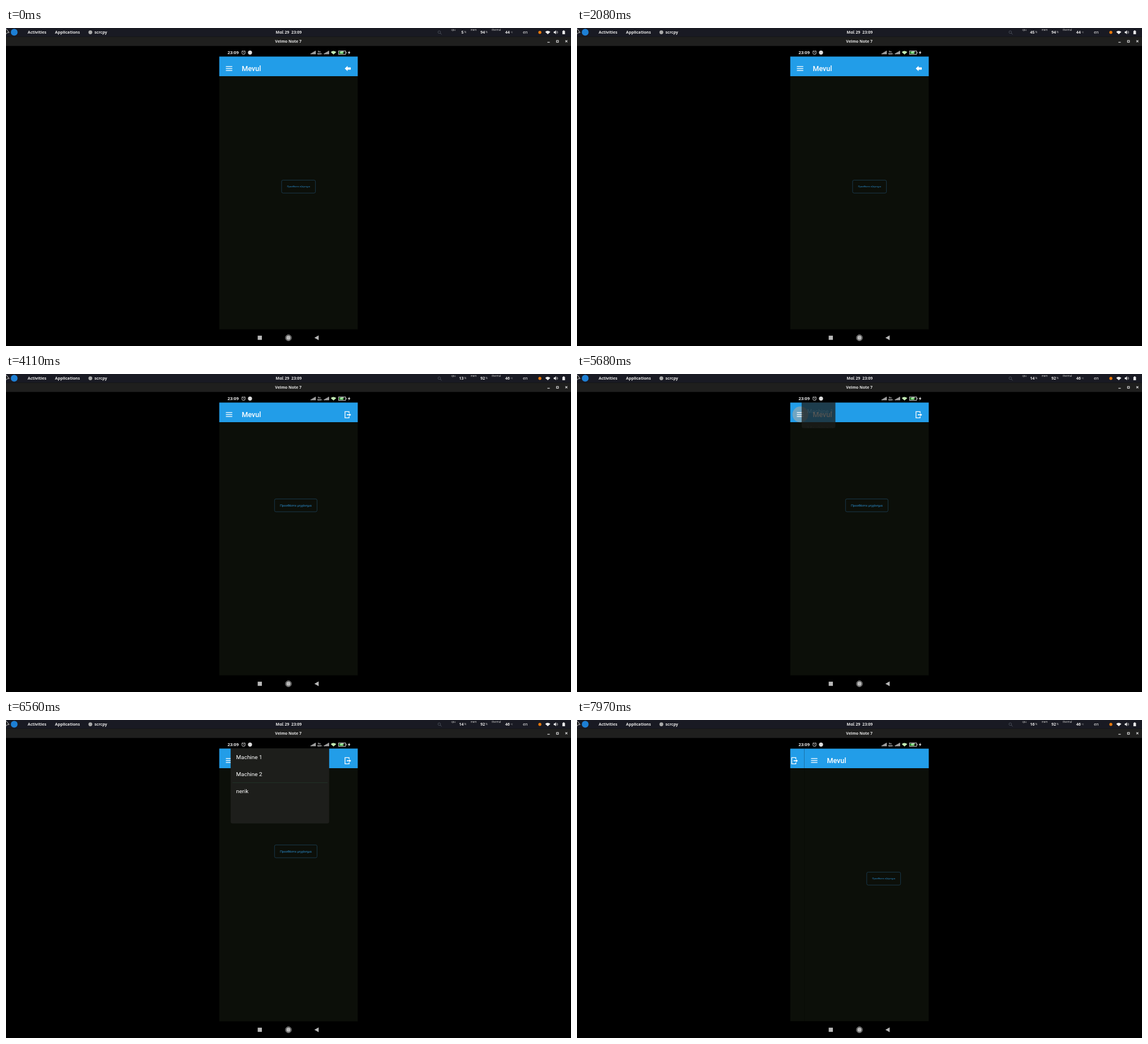
These frames come from a looping animation (998 by 561 pixels, 8 s). An HTML page with a canvas:

```html
<!DOCTYPE html>
<html lang="el">
<head>
<meta charset="utf-8">
<title>Phone mirror</title>
<style>
html, body { margin: 0; width: 100%; height: 100%; overflow: hidden; background: #000; }
canvas { display: block; width: 998px; height: 561px; }
</style>
</head>
<body>
<canvas id="stage" width="998" height="561"></canvas>
<script>
const ctx = document.getElementById('stage').getContext('2d');
const LOOP = 8000;
const NOTO = '"Noto Sans", sans-serif';
const ROBOTO = 'Roboto, sans-serif';
const APP = { x: 376.7, y: 50.4, w: 244.6, h: 481.2, bar: 34.6 };
const SURFACE = '#0c0f09';

const clamp = v => Math.max(0, Math.min(1, v));
const span = (t, from, to) => clamp((t - from) / (to - from));

function rect(x, y, w, h, color) {
  ctx.fillStyle = color;
  ctx.fillRect(x, y, w, h);
}

function text(str, x, y, size, { weight = 400, family = NOTO, color = '#fff', align = 'left' } = {}) {
  ctx.font = `${weight} ${size}px ${family}`;
  ctx.fillStyle = color;
  ctx.textAlign = align;
  ctx.fillText(str, x, y);
}

function disc(x, y, r, color) {
  ctx.fillStyle = color;
  ctx.beginPath();
  ctx.arc(x, y, r, 0, 7);
  ctx.fill();
}

function ring(x, y, r, width, color) {
  ctx.strokeStyle = color;
  ctx.lineWidth = width;
  ctx.beginPath();
  ctx.arc(x, y, r, 0, 7);
  ctx.stroke();
}

function trace(pts) {
  ctx.beginPath();
  pts.forEach(([x, y]) => ctx.lineTo(x, y));
}

function poly(pts, color) {
  trace(pts);
  ctx.closePath();
  ctx.fillStyle = color;
  ctx.fill();
}

function line(pts, width, color) {
  trace(pts);
  ctx.strokeStyle = color;
  ctx.lineWidth = width;
  ctx.stroke();
}

function wifi(x, y, r, color) {
  ctx.fillStyle = color;
  ctx.beginPath();
  ctx.moveTo(x, y);
  ctx.arc(x, y, r, -Math.PI * 0.77, -Math.PI * 0.23);
  ctx.fill();
}

function signal(x) {
  for (let i = 0; i < 5; i++) {
    const h = 1.5 + i * 1.1;
    rect(x + i * 1.9, 46.3 - h, 1.4, h, '#ddd');
  }
}

function drawTopBar(t) {
  const bold = { weight: 700, color: '#e6e6e6' };
  const right = { ...bold, align: 'right' };
  const small = { color: '#bbb' };
  const caption = { color: '#ccc' };
  rect(0, 0, 998, 15.5, '#191a23');
  disc(14.5, 7.5, 6, '#1d7fd4');
  poly([[0, 1], [5.5, 8], [2.5, 8.3], [0, 10.5]], '#222');
  line([[0, 1], [5.5, 8], [2.5, 8.3], [0, 10.5]], 0.9, '#ddd');
  text('Activities', 38.3, 10.3, 7.1, bold);
  text('Applications', 86.5, 10.3, 7.1, bold);
  disc(149, 7.6, 3.4, '#aaa');
  text('scrcpy', 156.3, 10.3, 7.1, bold);
  text('Μαΐ 29  23:09', 499.3, 10.3, 7.1, { ...bold, align: 'center' });

  ring(765.3, 7.3, 2.3, 0.9, '#4c525c');
  line([[767, 9], [769.5, 11.3]], 1, '#4c525c');

  const cpu = t < 2080 ? 5 : t < 3640 ? 45 : t < 5150 ? 13 : t < 6680 ? 14 : 16;
  const late = t >= 3920;
  text('cpu', 786.5, 4.8, 4.4, caption);
  text(cpu, 808.4, 10.3, 7.1, right);
  text('%', 809.5, 9.2, 4.4, small);
  text('mem', 820.7, 4.8, 4.4, caption);
  text(late ? 92 : 94, 846, 10.3, 7.1, right);
  text('%', 847, 9.2, 4.4, small);
  text('thermal', 858, 4.8, 4.4, caption);
  text(late ? 46 : 44, 889.9, 10.3, 7.1, right);
  text('°C', 891, 9.2, 4.2, small);
  text('en', 913, 10.3, 7.3, { color: '#eee', weight: 500 });

  disc(943, 7.8, 2.7, '#e8790c');
  wifi(957, 11, 6, '#eee');
  poly([[967.5, 6.2], [969, 6.2], [971.4, 4], [971.4, 11], [969, 9], [967.5, 9]], '#eee');
  for (const r of [1.6, 3.2]) {
    ctx.beginPath();
    ctx.arc(971.3, 7.6, r, -0.9, 0.9);
    ctx.strokeStyle = '#ccc';
    ctx.lineWidth = 0.8;
    ctx.stroke();
  }
  rect(982.8, 5.2, 4.6, 5.8, '#eee');
  rect(984, 4.2, 2.2, 1, '#eee');
}

function drawTitleBar() {
  rect(0, 15.5, 998, 16.2, '#1f1f1e');
  text('Velmo Note 7', 498.6, 26.3, 7, { weight: 700, color: '#e4e4e4', align: 'center' });
  rect(956.3, 24.6, 4.2, 1.2, '#ddd');
  ctx.strokeStyle = '#ddd';
  ctx.lineWidth = 1.1;
  ctx.strokeRect(972.4, 22, 3.4, 3.2);
  line([[988, 21.6], [991.6, 25.2]], 1.1, '#ddd');
  line([[991.6, 21.6], [988, 25.2]], 1.1, '#ddd');
}

function drawPhoneFrame() {
  text('23:09', 391.3, 46.3, 7.7, { weight: 700, color: '#eee' });
  ring(419.6, 43.6, 3, 0.9, '#ddd');
  line([[419.6, 41.8], [419.6, 43.8], [421, 44.5]], 0.7, '#ddd');
  line([[416, 41.6], [418, 39.8]], 0.8, '#ddd');
  line([[421.2, 39.8], [423.2, 41.6]], 0.8, '#ddd');
  disc(431, 43.3, 3.6, '#ddd');
  signal(538);
  text('Vo', 550.8, 42.8, 4, { weight: 700, color: '#ddd' });
  text('WiFi', 550, 46.7, 4, { weight: 700, color: '#ddd' });
  signal(561.5);
  wifi(578.5, 46.8, 6.3, '#bfe8b0');
  ctx.strokeStyle = '#ddd';
  ctx.lineWidth = 0.9;
  ctx.strokeRect(587.4, 40.5, 12.4, 6);
  rect(588.6, 41.6, 7.5, 3.8, '#43c543');
  rect(600.6, 42.3, 1, 2.4, '#ddd');
  text('67', 593.5, 45.4, 4.8, { weight: 700, align: 'center' });
  poly([[606.8, 40], [603.8, 44], [605.8, 44], [605, 47], [608.4, 42.8], [606.4, 42.8]], '#eee');

  rect(444.6, 542.8, 7.4, 7.4, '#b8b8b8');
  ring(498.9, 546.5, 5.2, 0.9, '#b8b8b8');
  disc(498.9, 546.5, 3.9, '#b8b8b8');
  poly([[544.8, 546.5], [552.3, 542.2], [552.3, 550.8]], '#b8b8b8');
}

function drawBackIcon() {
  poly([[598.4, 71.5], [603.4, 66.8], [603.4, 69.5], [609, 69.5],
        [609, 73.5], [603.4, 73.5], [603.4, 76.2]], '#fff');
}

function drawExitIcon() {
  line([[606, 69], [606, 66.4], [598.8, 66.4], [598.8, 77.3], [606, 77.3], [606, 74.7]], 1.3, '#fff');
  poly([[602, 71.1], [606.4, 71.1], [606.4, 69.2], [609.6, 71.9], [606.4, 74.6], [606.4, 72.7], [602, 72.7]], '#fff');
}

function drawButton(label, x, y, w, h, size) {
  ctx.beginPath();
  ctx.roundRect(x, y, w, h, 2.5);
  ctx.strokeStyle = '#1b3d52';
  ctx.lineWidth = 0.9;
  ctx.stroke();
  text(label, x + w / 2, y + h / 2 + size * 0.35, size,
    { family: ROBOTO, color: '#2b8fd2', align: 'center' });
}

// Touch feedback under the menu icon
function drawRipple(t) {
  if (t < 5390 || t > 6180) return;
  const r = t < 5680 ? 6 + 8 * span(t, 5390, 5680) : 14 + 1.5 * span(t, 5680, 5750);
  ctx.globalAlpha = 0.6 * span(t, 5390, 5480) * (1 - span(t, 5760, 6180));
  disc(394.6, 71.3, r, '#a6aca8');
  ctx.globalAlpha = 1;
}

// One app screen, moved sideways by dx
function drawPage(kind, dx, t) {
  ctx.save();
  ctx.translate(dx, 0);
  rect(APP.x, APP.y, APP.w, APP.h, SURFACE);
  rect(APP.x, APP.y, APP.w, APP.bar, '#229de8');
  drawRipple(t);
  for (const y of [67.4, 70.9, 74.3]) rect(388.4, y, 11.3, 1.3, '#fff');
  text('Mevul', 416.5, 76, 12.5, { weight: 500, family: ROBOTO });
  if (kind === 'part') {
    drawBackIcon();
    drawButton('Προσθέστε εξάρτημα', 486.8, 268.4, 59.8, 22.8, 4.15);
  } else {
    drawExitIcon();
    drawButton('Προσθέστε μηχάνημα', 474.3, 220.4, 75.1, 22.6, 5.65);
  }
  ctx.restore();
}

function drawMenu(t) {
  const open = span(t, 5645, 5750);
  const shown = 1 - span(t, 7560, 7700);
  if (!open || !shown) return;
  ctx.save();
  ctx.globalAlpha = Math.min(1, open * 2.2) * shown;
  ctx.beginPath();
  ctx.roundRect(396.8, 50, 174 * open, 132.5 * open, [0, 0, 3.5, 3.5]);
  ctx.fillStyle = '#1d1e1b';
  ctx.fill();
  ctx.clip();
  rect(400, 110.3, 168, 0.8, '#22382c');
  ['Machine 1', 'Machine 2', 'nerik'].forEach((item, i) => {
    ctx.globalAlpha = shown * clamp(open * 1.6 - 0.45 - i * 0.07);
    text(item, 406.6, 69.3 + i * 29.9, 9.95, { family: ROBOTO });
  });
  ctx.restore();
}

function drawApp(t) {
  ctx.save();
  const slide = 1 - (1 - span(t, 7760, 8157)) ** 3;
  if (slide > 0) {
    ctx.beginPath();
    ctx.rect(APP.x, APP.y, APP.w, APP.h);
    ctx.clip();
    rect(APP.x, APP.y, APP.w, APP.bar, '#229de8');
  }
  if (t < 4080) {
    drawPage('part', 0, t);
  } else {
    drawPage('machine', -APP.w * slide, t);
    if (slide > 0) drawPage('part', Math.round(APP.w * (1 - slide)), t);
  }
  drawMenu(t);
  ctx.restore();
}

function draw() {
  const t = performance.now() % LOOP;
  rect(0, 0, 998, 561, '#000');
  drawTopBar(t);
  drawTitleBar();
  drawPhoneFrame();
  drawApp(t);
  requestAnimationFrame(draw);
}
draw();
</script>
</body>
</html>
```
